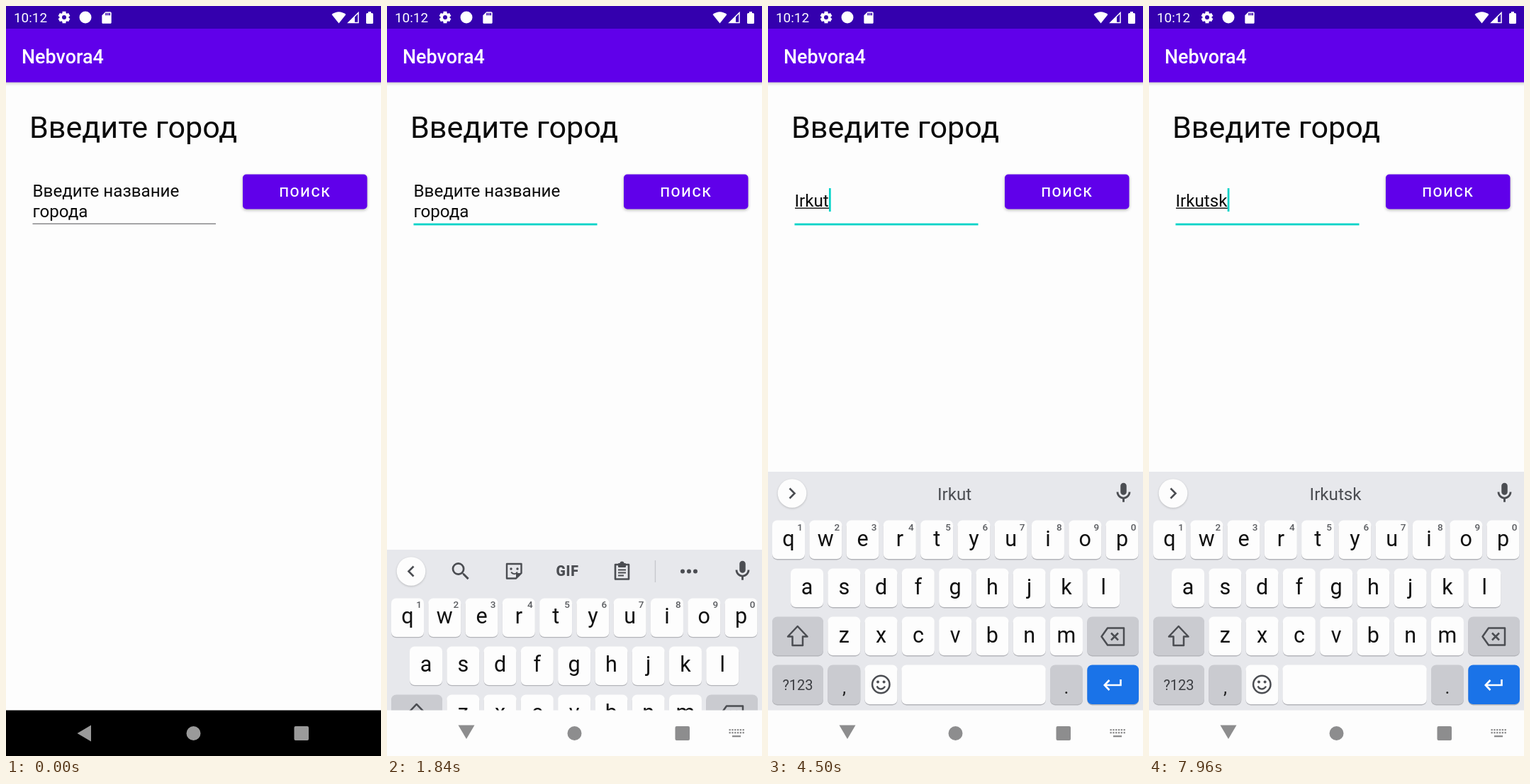
An HTML page with a canvas for the animation above (8 s loop, 529 by 1058 pixels).

```html
<!DOCTYPE html>
<html lang="ru">
<head>
<meta charset="utf-8">
<title>City search</title>
<style>
html, body { margin: 0; width: 100%; height: 100%; overflow: hidden; background: #fdfdfd; }
canvas { display: block; width: 529px; height: 1058px; }
</style>
</head>
<body>
<canvas id="stage" width="529" height="1058"></canvas>
<script>
const W = 529, H = 1058, LOOP = 8000;
const ctx = document.getElementById('stage').getContext('2d');

const PURPLE = '#6000ea', TEAL = '#02d3c8', INK = '#4b4d52';
const FOCUS = 900, CARET = 1100, KEYS_UP = 1760, SLIDE = 260;
const TYPE = 3350, STEP = 250, PRESS = 7130;
const WORD = 'Irkutsk';
const HINTS = [
  ['I', "I'm", 'If'], ['Ir', 'Iris', 'Iron'], ['Irk', 'Irked', 'Irks'],
  ['', 'Irku', ''], ['', 'Irkut', ''], ['', 'Irkuts', ''], ['', 'Irkutsk', '']
];

const SD = new Path2D('M18 2h-8L4 8v12c0 1.1.9 2 2 2h12c1.1 0 2-.9 2-2V4c0-1.1-.9-2-2-2zm-6 6h-2V4h2v4zm3 0h-2V4h2v4zm3 0h-2V4h2v4z');
const SEARCH = new Path2D('M15.5 14h-.79l-.28-.27A6.47 6.47 0 0 0 16 9.5 6.5 6.5 0 1 0 9.5 16c1.61 0 3.09-.59 4.23-1.57l.27.28v.79l5 4.99L20.49 19l-4.99-5zm-6 0C7.01 14 5 11.99 5 9.5S7.01 5 9.5 5 14 7.01 14 9.5 11.99 14 9.5 14z');
const MIC = new Path2D('M12 14c1.66 0 3-1.34 3-3V5c0-1.66-1.34-3-3-3S9 3.34 9 5v6c0 1.66 1.34 3 3 3zm5-3c0 2.76-2.24 5-5 5s-5-2.24-5-5H5c0 3.53 2.61 6.43 6 6.92V21h2v-3.08c3.39-.49 6-3.39 6-6.92h-2z');

const clamp = v => Math.min(1, Math.max(0, v));
const easeOut = v => 1 - (1 - v) ** 3;

function rect(x, y, w, h, color) {
  ctx.fillStyle = color;
  ctx.fillRect(x, y, w, h);
}

function round(x, y, w, h, r, color) {
  ctx.fillStyle = color;
  ctx.beginPath();
  ctx.roundRect(x, y, w, h, r);
  ctx.fill();
}

function disc(x, y, r, color) {
  ctx.fillStyle = color;
  ctx.beginPath();
  ctx.arc(x, y, r, 0, 7);
  ctx.fill();
}

function ring(x, y, r, width, color, from = 0, to = 7) {
  ctx.strokeStyle = color;
  ctx.lineWidth = width;
  ctx.beginPath();
  ctx.arc(x, y, r, from, to);
  ctx.stroke();
}

function trace(points) {
  ctx.beginPath();
  for (let i = 0; i < points.length; i += 2) ctx.lineTo(points[i], points[i + 1]);
}

function poly(points, color) {
  trace(points);
  ctx.fillStyle = color;
  ctx.fill();
}

function line(points, width, color, closed) {
  trace(points);
  if (closed) ctx.closePath();
  ctx.strokeStyle = color;
  ctx.lineWidth = width;
  ctx.stroke();
}

function text(str, x, y, size, color, weight = 400, align = 'left', spacing = 0) {
  ctx.font = `${weight} ${size}px Roboto, sans-serif`;
  ctx.letterSpacing = spacing + 'px';
  ctx.textAlign = align;
  ctx.fillStyle = color;
  ctx.fillText(str, x, y);
}

function icon(path, cx, cy, size, color) {
  ctx.save();
  ctx.translate(cx - size / 2, cy - size / 2);
  ctx.scale(size / 24, size / 24);
  ctx.fillStyle = color;
  ctx.fill(path);
  ctx.restore();
}

function shadow(color, blur, dy, draw) {
  ctx.save();
  ctx.shadowColor = color;
  ctx.shadowBlur = blur;
  ctx.shadowOffsetY = dy;
  draw();
  ctx.restore();
}

function statusBar() {
  rect(0, 0, W, 32, '#3400ae');
  text('10:12', 11, 23, 18.9, '#fff');
  for (let i = 0; i < 3; i++) {
    const a = Math.PI * (i / 3 + 1 / 6 + 1 / 3);
    const c = Math.cos(a) * 8.3, s = Math.sin(a) * 8.3;
    line([82 - c, 16 - s, 82 + c, 16 + s], 5, '#fff');
  }
  disc(82, 16, 6.6, '#fff');
  disc(82, 16, 3, '#3400ae');
  disc(112, 16, 8.5, '#fff');
  icon(SD, 142, 16.5, 20, '#fff');
  ctx.beginPath();
  ctx.moveTo(469.5, 24.5);
  ctx.lineTo(459.5, 12);
  ctx.quadraticCurveTo(469.5, 4.5, 479.5, 12);
  ctx.fillStyle = '#fff';
  ctx.fill();
  line([483, 23.5, 497, 23.5, 497, 9.5], 1.5, '#fff', true);
  poly([482, 24, 492, 24, 492, 14], '#fff');
  round(508, 10, 10, 15, 1.5, '#fff');
  rect(511, 8, 4, 3, '#fff');
}

function button(t) {
  const x = 334, y = 237.5, w = 175.5, h = 49;
  const lift = t > PRESS && t < PRESS + 450 ? 1.5 : 0;
  shadow('rgba(0,0,0,.3)', 4 + lift * 2, 1.5 + lift, () => round(x, y, w, h, 5, PURPLE));
  const age = t - PRESS;
  if (age > 0 && age < 500) {
    const p = clamp(age / 250);
    ctx.save();
    ctx.beginPath();
    ctx.roundRect(x, y, w, h, 5);
    ctx.clip();
    disc(343 + 37 * p, 243 + 6 * p, 30 + 156 * p, `rgba(255,255,255,${0.075 * clamp((500 - age) / 250)})`);
    ctx.restore();
  }
  text('ПОИСК', 385.5, 269, 18.9, '#fff', 500, 'left', 1.68);
}

function field(t, typed) {
  const focused = t >= FOCUS;
  if (typed) {
    text(typed, 37.5, 283, 24.2, '#0b0b0b');
  } else {
    text('Введите название', 37.5, 269, 24.2, '#0b0b0b');
    text('города', 37.5, 298, 24.2, '#0b0b0b');
  }
  const width = typed ? ctx.measureText(typed).width : 0;
  if (typed.length > 1) rect(38, 284.5, width, 1.4, '#0b0b0b');
  if (focused) rect(37.5, 306.6, 259, 2.8, TEAL);
  else rect(37.5, 306.6, 258.5, 1.3, '#77777a');

  const last = typed ? TYPE + (typed.length - 1) * STEP : CARET;
  if (t >= CARET && (t - last) % 1000 < 500) rect(37.7 + width, 257, 2.7, 33, TEAL);
}

function toolbar() {
  icon(SEARCH, 104, 687.5, 33, INK);
  // sticker
  ctx.lineJoin = 'round';
  line([169, 677, 189.5, 677, 189.5, 690, 182, 697.5, 169, 697.5], 2.4, INK, true);
  poly([189.5, 690, 182, 690, 182, 697.5], INK);
  disc(175, 684, 1.7, INK);
  disc(184, 684, 1.7, INK);
  ring(179.5, 686, 5, 2, INK, 0.5, 2.6);
  text('GIF', 254.5, 694, 19.5, INK, 900, 'center', 0.8);
  // clipboard
  line([322, 678, 341, 678, 341, 698.5, 322, 698.5], 2.6, INK, true);
  round(326, 676, 11, 6, 1, INK);
  disc(331.5, 676.5, 3, INK);
  for (let i = 0; i < 3; i++) rect(326, 684.5 + i * 4, i < 2 ? 11 : 8, 2, INK);
  ctx.lineJoin = 'miter';
  rect(377.8, 672, 1.3, 31, '#c6c7cc');
  for (let i = 0; i < 3; i++) disc(417 + i * 9, 687.5, 3, INK);
}

function hints(list) {
  list.forEach((word, i) => text(word, 118.5 + i * 144.6, 697, 24.2, INK, 400, 'center'));
  if (list[0]) for (const x of [186.4, 339.6]) rect(x, 671, 1.3, 32, '#c0c1c6');
}

function key(x, y, w, color = '#fdfdfd', h = 54.5) {
  round(x, y + 1.4, w, h, 7, '#b4b5ba');
  round(x, y, w, h, 7, color);
}

function letterRow(chars, x, y, digits) {
  [...chars].forEach((c, i) => {
    const left = x + i * 52.28;
    key(left, y, 46);
    text(c, left + 23, y + 36, 30.5, '#111', 400, 'center');
    if (digits) text((i + 1) % 10, left + 39, y + 14, 13.5, '#5a5c60', 500, 'center');
  });
}

function keyboard(typed) {
  rect(0, 657, W, 337, '#e7e8ec');
  shadow('rgba(0,0,0,.2)', 3, 1, () => disc(34, 687.5, 20.3, '#fdfdfd'));
  const d = typed ? 1 : -1;
  line([34 - 3.5 * d, 680.5, 34 + 3.5 * d, 687.5, 34 - 3.5 * d, 694.5], 2.6, INK);
  if (typed) hints(HINTS[typed.length - 1]);
  else toolbar();
  icon(MIC, 501.5, 687, 34, INK);

  letterRow('qwertyuiop', 6, 725.5, true);
  letterRow('asdfghjkl', 32, 793.5);
  letterRow('zxcvbnm', 84.3, 861.5);

  const gray = '#cacbd0';
  key(6, 861.5, 72, gray);
  key(450.3, 861.5, 72.7, gray);
  ctx.lineJoin = 'round';
  line([41.7, 875, 55.5, 889.5, 49, 889.5, 49, 902, 34.5, 902, 34.5, 889.5, 28, 889.5], 2.5, INK, true);
  line([470.5, 889.5, 479, 877.5, 502, 877.5, 502, 901.5, 479, 901.5], 2.5, INK, true);
  ctx.lineJoin = 'miter';
  line([484, 884.5, 494, 894.5], 2.5, INK);
  line([494, 884.5, 484, 894.5], 2.5, INK);

  const y = 929.5, h = 55.5;
  key(6, y, 72, gray, h);
  key(84.3, y, 46, gray, h);
  key(136.5, y, 46, '#fdfdfd', h);
  key(188.3, y, 203.5, '#fdfdfd', h);
  key(398, y, 46, gray, h);
  key(450.3, y, 72.7, '#1a73e8', h);
  text('?123', 42, 965, 20, '#3c3e42', 400, 'center');
  text(',', 107.5, 970, 26, '#222', 400, 'center');
  text('.', 421, 970, 26, '#222', 400, 'center');
  ring(159.3, 957, 12.2, 2.5, INK);
  disc(155, 953.5, 2, INK);
  disc(163.6, 953.5, 2, INK);
  ring(159.3, 957.5, 6, 2.4, INK, 0.35, 2.8);
  line([497.5, 950, 497.5, 958, 475, 958], 2.6, '#fff');
  line([481.5, 951, 474.8, 958, 481.5, 965], 2.6, '#fff');
}

function navBar(light) {
  const c = light ? '#8d8d8e' : '#9a9a9a';
  rect(0, 993.5, W, H - 993.5, light ? '#fdfdfd' : '#000');
  if (light) {
    poly([100.5, 1014.5, 123.5, 1014.5, 112, 1034], c);
    for (let i = 0; i < 6; i++) {
      rect(482.5 + i * 3.8, 1020, 2.3, 2.3, c);
      rect(482.5 + i * 3.8, 1024, 2.3, 2.3, c);
    }
    rect(487, 1029, 12, 2.3, c);
  } else {
    poly([100.5, 1026, 120, 1014.5, 120, 1037.5], c);
  }
  disc(264.5, 1026, 10, c);
  round(406.5, 1016, 20.5, 20, 2, c);
}

function draw(t) {
  rect(0, 0, W, H, '#fdfdfd');
  shadow('rgba(0,0,0,.28)', 5, 1.5, () => rect(-10, 32, W + 20, 75.6, PURPLE));
  statusBar();
  text('Nebvora4', 22, 81, 26.9, '#fff', 500);
  text('Введите город', 33, 186, 43.1, '#0b0b0b');

  const count = t < TYPE ? 0 : Math.min(WORD.length, 1 + Math.floor((t - TYPE) / STEP));
  const typed = WORD.slice(0, count);
  field(t, typed);
  button(t);

  const open = t >= KEYS_UP;
  if (open) {
    ctx.save();
    ctx.translate(0, 337 * (1 - easeOut(clamp((t - KEYS_UP) / SLIDE))));
    keyboard(typed);
    ctx.restore();
  }
  navBar(open);
}

const start = performance.now();
function frame() {
  draw((performance.now() - start) % LOOP);
  requestAnimationFrame(frame);
}
frame();
</script>
</body>
</html>
```
